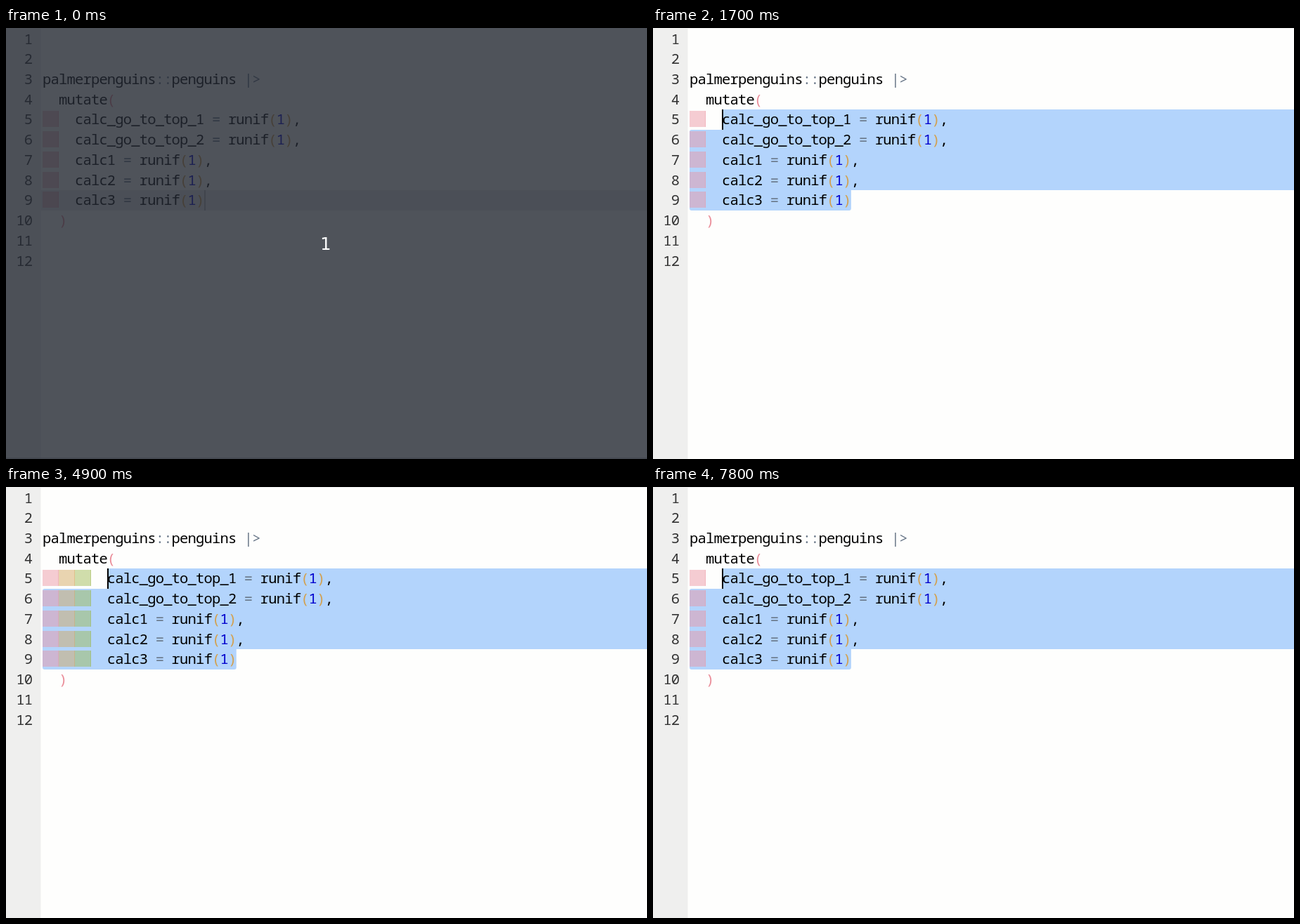
An HTML page with a canvas for the animation above (8.2 s loop, 912x614 px).

```html
<!DOCTYPE html>
<html lang="en">
<head>
<meta charset="utf-8">
<title>Indenting code</title>
<style>
  html, body { margin: 0; width: 100%; height: 100%; overflow: hidden; background: #fefefd; }
  canvas { display: block; }
</style>
</head>
<body>
<canvas id="stage" width="912" height="614"></canvas>
<script>
const ctx = document.getElementById('stage').getContext('2d');
const W = 912, H = 614, LOOP = 8200;
const LEFT = 52.5, CELL = 11.47, TOP = 1.5, LINE = 28.73;
const FONT = '20.5px "Noto Sans Mono", "DejaVu Sans Mono", monospace';

const BLACK = '#000', GREY = '#687687', BLUE = '#0000cd', PINK = '#ea8c98', GOLD = '#d3a04f';
const LEVELS = ['234,147,161', '209,164,89', '155,183,79', '55,200,145', '69,181,224'];
const CALLS = ['calc_go_to_top_1', 'calc_go_to_top_2', 'calc1', 'calc2', 'calc3'];
const ANCHOR = { line: 9, col: 20 };

// Dragging the selection: [time, line, column]
const DRAG = [
  [1000, 8, 20], [1100, 7, 19], [1200, 6, 17], [1300, 6, 14],
  [1400, 5, 11], [1500, 5, 8], [1600, 5, 6], [1700, 5, 4]
];
// Indent changes: [time, columns]
const INDENTS = [
  [0, 4], [2300, 6], [2600, 8], [2800, 10], [3600, 8], [3800, 6], [4000, 4],
  [4700, 6], [4900, 8], [5100, 10], [5300, 12], [6000, 10], [6200, 8], [6400, 6], [6800, 4]
];
// Spans in which the caret is blinked off
const BLINKS = [[3400, 3600], [4600, 4700], [5800, 6000], [7400, 7800]];

const colX = col => LEFT + col * CELL;
const lineY = line => Math.round(TOP + (line - 1) * LINE);
const latest = (steps, t) => steps.filter(s => s[0] <= t).pop();

function rect(x, y, w, h, color) {
  ctx.fillStyle = color;
  ctx.fillRect(x, y, w, h);
}

function bar(line, x0, x1, color, radii = 0) {
  const y = lineY(line);
  ctx.fillStyle = color;
  ctx.beginPath();
  ctx.roundRect(x0, y, x1 - x0, lineY(line + 1) - y, radii);
  ctx.fill();
}

function write(line, col, parts) {
  for (const [text, color] of parts) {
    ctx.fillStyle = color;
    ctx.fillText(text, colX(col) + spacing / 2, lineY(line) + 21);
    col += text.length;
  }
}

function drawSelection(head, indent) {
  const color = '#b3d4fc';
  const endX = colX(ANCHOR.col + indent - 4);
  bar(head.line, colX(head.col), W, color);
  for (let line = head.line + 1; line < ANCHOR.line; line++) {
    bar(line, 52, W, color, line === head.line + 1 ? [3, 0, 0, 0] : 0);
  }
  bar(ANCHOR.line, 52, endX, color, [0, 0, 3, 3]);
}

function drawIndents(line, indent) {
  const y = lineY(line) + 2;
  for (let i = 0; i < indent / 2 - 1; i++) {
    const x = Math.round(colX(i * 2) - 0.4);
    const end = Math.round(colX(i * 2 + 2) - 0.4);
    rect(x, y, end - x, 23, `rgba(${LEVELS[i]},0.47)`);
    rect(end - 1, y, 1, 23, `rgba(${LEVELS[i]},0.4)`);
  }
}

function drawCode(indent) {
  for (let n = 1; n <= 12; n++) {
    const label = String(n);
    write(n, (37.7 - LEFT) / CELL - label.length, [[label, '#333']]);
  }
  write(3, 0, [['palmerpenguins', BLACK], ['::', GREY], ['penguins ', BLACK], ['|>', GREY]]);
  write(4, 2, [['mutate', BLACK], ['(', PINK]]);
  CALLS.forEach((name, i) => write(5 + i, indent, [
    [name, BLACK], [' = ', GREY], ['runif', BLACK], ['(', GOLD], ['1', BLUE], [')', GOLD],
    [i < CALLS.length - 1 ? ',' : '', BLACK]
  ]));
  write(10, 2, [[')', PINK]]);
}

function drawCaret(line, col, color) {
  rect(Math.round(colX(col)), lineY(line), 2, lineY(line + 1) - lineY(line), color);
}

function drawCountdown() {
  rect(0, 0, W, H, 'rgba(36,41,51,0.8)');
  rect(0, H - 2, W, 2, 'rgba(36,41,51,0.2)');
  ctx.font = '24px "DejaVu Sans", sans-serif';
  ctx.letterSpacing = '0px';
  ctx.textAlign = 'center';
  ctx.fillStyle = '#fff';
  ctx.fillText('1', 455, 316);
}

ctx.font = FONT;
const spacing = CELL - ctx.measureText('0').width;

function draw(t) {
  const indent = latest(INDENTS, t)[1];
  const drag = latest(DRAG, t);
  ctx.font = FONT;
  ctx.letterSpacing = spacing + 'px';
  ctx.textAlign = 'left';

  rect(0, 0, W, H, '#fefefd');
  rect(0, 0, W, 1, '#efefef');
  rect(0, 0, 49.5, H, '#efefee');

  const head = drag && { line: drag[1], col: drag[2] + indent - 4 };
  if (head) drawSelection(head, indent);
  else bar(ANCHOR.line, 49.5, W, '#ebebea');

  for (let line = 5; line <= 9; line++) drawIndents(line, indent);
  drawCode(indent);

  if (!head) drawCaret(ANCHOR.line, ANCHOR.col, '#b9b9b9');
  else if (!BLINKS.some(([a, b]) => t >= a && t < b)) drawCaret(head.line, head.col, BLACK);

  if (t < 100) drawCountdown();
}

function tick() {
  draw(performance.now() % LOOP);
  requestAnimationFrame(tick);
}
tick();
</script>
</body>
</html>
```
